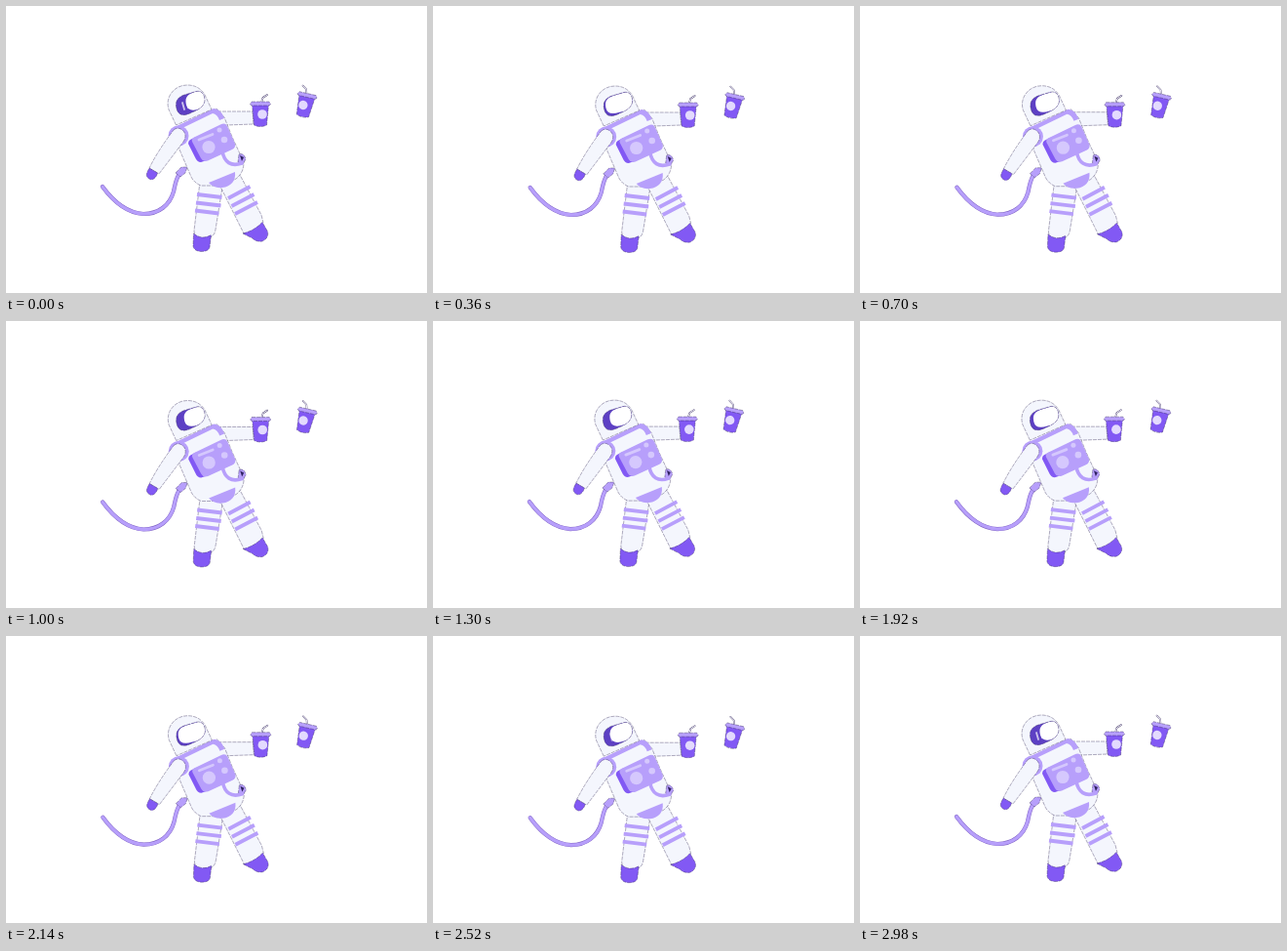
Animation of 432x294 px, one loop 3000 ms. Source, as an HTML page:

```html
<!DOCTYPE html>
<html lang="en">
<head>
<meta charset="utf-8">
<title>Floating astronaut</title>
<style>
  html, body { margin: 0; width: 100%; height: 100%; overflow: hidden; background: #fff; }
  svg { display: block; width: 432px; height: 294px; }
  .suit { fill: #f4f6fd; }
  .lilac { fill: #b79ffb; }
  .deep { fill: #8259f4; }
  .pale { fill: #d5c8fd; }
  .edge { stroke: #2b2050; stroke-width: .5; stroke-opacity: .75; stroke-dasharray: 4 1; }
  .band { fill: none; stroke: #b79ffb; stroke-width: 3.8; }
  .line { fill: none; stroke-linecap: round; stroke-linejoin: round; }
</style>
</head>
<body>
<svg viewBox="0 0 432 294">
  <defs>
    <clipPath id="visorClip">
      <path id="visorShape" d="M175 105C173 97 177 93 183 91L195 87.5C201 86 204 91 204 97C203 103 198 106 191 109C183 113 177 113 175 105Z"/>
    </clipPath>
    <g id="cup">
      <path id="straw" class="line" d="M1 -11L2.5 -16L7 -19" stroke="#3b3060" stroke-width="1.6"/>
      <path class="line" d="M1 -11L2.5 -16L7 -19" stroke="#f7f5ff" stroke-width="1"/>
      <path class="deep edge" d="M-8.5 -9H8.5L6.5 12Q0 15 -6.5 12Z"/>
      <path class="lilac edge" d="M-9 -12H9L10.5 -9.5Q10 -8 8 -8H-8Q-10 -8 -10.5 -9.5Z"/>
      <circle fill="#e3dafe" cx="2" cy="1" r="4.8"/>
    </g>
  </defs>
  <g id="scene">
    <g class="line">
      <path d="M99 185C110 200 124 212 141 213C157 213 168 204 172 190C174 180 176 172 182 168" stroke="#8064c4" stroke-width="4.2"/>
      <path d="M99 185C110 200 124 212 141 213C157 213 168 204 172 190C174 180 176 172 182 168" stroke="#b79ffb" stroke-width="3.3"/>
    </g>
    <path class="lilac edge" d="M174 171L180 165L186 165L184 171L179 175Z"/>

    <path class="suit edge" d="M212 108L253 108L254 121L226 122Z"/>
    <use href="#cup" transform="translate(261 110)"/>
    <use href="#cup" transform="translate(307 101) rotate(13) scale(-.97 .97)"/>

    <path class="suit edge" d="M199 180L222 186L215 229C214 237 207 239 201 238Q193 237 193 230Z"/>
    <path class="suit edge" d="M220 185L240 173L262 214L264 222C260 229 251 234 244 233Z"/>
    <path class="band" d="M196 193L221.500 196M195 201.500L220.500 204.500M194 209.500L218.500 212.500"/>
    <path class="band" d="M228 197L250.500 185M231.500 205L254.500 193M235 213L258 201"/>
    <path class="deep edge" d="M192.500 233Q201 240 210.500 234.500L209 247Q208 251.500 200 251.500Q193 251 192 246Z"/>
    <path class="deep edge" d="M243 233Q255 230 263 221.500L268.500 231Q270 238 263 241Q257 242 253 238Z"/>

    <path class="suit edge" d="M175 125L216 105L224 114L232 134L244 160Q244 171 236 177L222 184L200 184Q193 181 190 175L178 147Z"/>
    <path class="lilac" d="M208 181L235 170C236 179 231 185 222 186Q213 187 208 181Z"/>
    <path class="lilac" d="M173 124L213 105Q220 105 224 115L219 117Q217 111 212 110L181 125L176 129Z"/>
    <path class="lilac edge" d="M239 152Q244 150 246 157L243 162L238 160Z"/>
    <path fill="#2f2262" d="M240 153L244 155L242 159Z"/>
    <path class="line" d="M222 149C224 160 231 165 242 161" stroke="#b79ffb" stroke-width="3.6"/>

    <path class="deep" d="M189 137L195 134L206 158L200 160Q196 160 194 155L187 141Q187 138 189 137Z"/>
    <path class="lilac" d="M193 134.500L220 121.500Q225 119 227 123L235 141Q236 145 232 147L207 158.500Q202 160 200 156L191 139Q190 136 193 134.500Z"/>
    <path class="line" d="M198 137L212 131.500" stroke="#d5c8fd" stroke-width="2.8"/>
    <circle class="pale" cx="208" cy="144.500" r="6.600"/>
    <circle class="pale" cx="224" cy="137" r="3.300"/>
    <circle class="pale" cx="219" cy="127" r="2.500"/>

    <circle class="lilac" cx="177" cy="133" r="10.500"/>
    <path class="suit edge" d="M172 127Q177 123 182 128Q186 133 182 139L157 172L147 166Q156 148 172 127Z"/>
    <path class="deep edge" d="M147 166L155.500 171Q154 177 149 178Q143 176 144.500 171Z"/>

    <path class="suit edge" d="M174.500 122L167 106C163 94 172 81 186 81Q198 81 204 91L211 106Z"/>
    <use href="#visorShape" fill="#5d40c4"/>
    <g clip-path="url(#visorClip)">
      <path id="glare" fill="#fff" d="M176 105C174 97 178 94 184 92L196 88.500Q206 86 207 97L200 107L190 109Q178 113 176 105Z"/>
      <path id="glint" class="line" d="M181 99L183 106M186 98L187 104" stroke="#fff" stroke-width="1.800"/>
    </g>
    <use href="#visorShape" class="edge" fill="none"/>
  </g>
</svg>
<script>
  const LOOP = 3000;
  const scene = document.getElementById("scene");
  const glare = document.getElementById("glare");
  const glint = document.getElementById("glint");

  // time, drift x, drift y, glare offset, glint strength
  const poses = [
    [0, 0, 0, 9, .7],
    [360, .7, 1, .8, 0],
    [1000, .2, .5, 7, 0],
    [1680, -.7, -.5, 4.5, 0],
    [2140, .4, .7, .8, 0],
    [2520, .7, 1.2, 5.5, .4],
    [3000, 0, 0, 9, .7]
  ];

  function poseAt(time) {
    const next = poses.findIndex(pose => pose[0] > time);
    const from = poses[next - 1], to = poses[next];
    const part = (time - from[0]) / (to[0] - from[0]);
    const ease = (1 - Math.cos(Math.PI * part)) / 2;
    return from.map((value, i) => value + (to[i] - value) * ease);
  }

  function draw(time) {
    const [, x, y, shift, strength] = poseAt(time % LOOP);
    scene.setAttribute("transform", `translate(${x} ${y})`);
    glare.setAttribute("transform", `translate(${shift} ${-1 - shift * .3})`);
    glint.setAttribute("opacity", strength);
  }

  const start = performance.now();
  function tick() {
    draw(performance.now() - start);
    requestAnimationFrame(tick);
  }
  tick();
</script>
</body>
</html>
```
